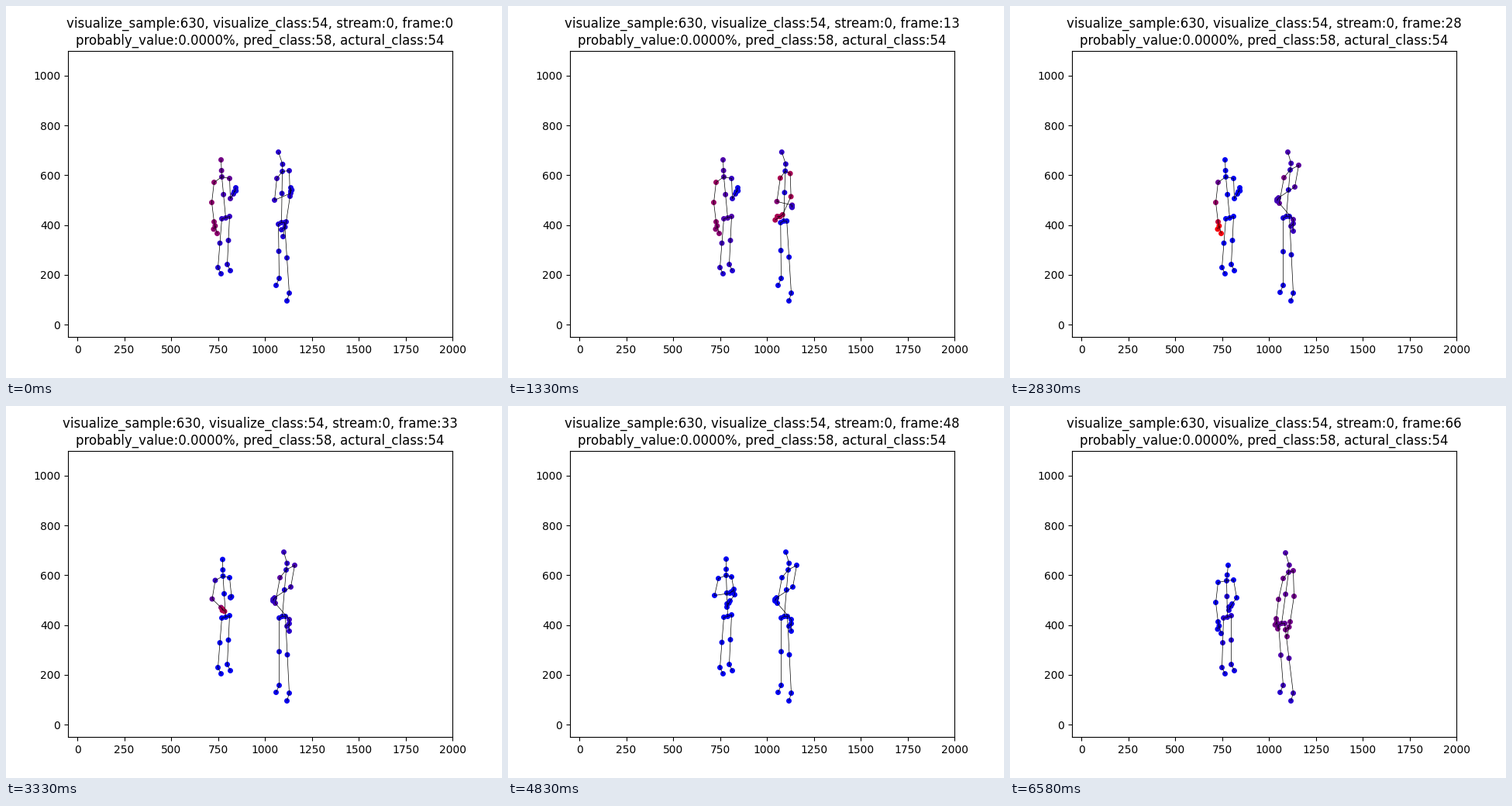
Recreate the animation shown at these times as a matplotlib script. Size 640 px wide and 480 px high, loop 6660 ms.

```python
import numpy as np
import matplotlib.pyplot as plt
from matplotlib.animation import FuncAnimation
from matplotlib.collections import LineCollection

STEP_MS, LOOP_MS = 30, 6660
BEAT_MS = 1000 / 12


def pose(*points):
    return np.array(points, float)


def to_data(px):
    """Stage pixels (y down) to axes units."""
    x = (px[:, 0] + 0.5 - 80) / 496 * 2050 - 50
    y = 1100 - (px[:, 1] + 0.5 - 57.6) / 369.6 * 1150
    return np.column_stack([x, y])


def blend(keys, n):
    """Pose and (root, tip) heat at counter n from keys (n, pose, root, tip)."""
    times = [k[0] for k in keys]
    i = int(np.clip(np.searchsorted(times, n, side="right") - 1, 0, len(keys) - 2))
    u = (n - times[i]) / (times[i + 1] - times[i])
    a, b = keys[i], keys[i + 1]
    heat = [p + (q - p) * u for p, q in zip(a[2:], b[2:])]
    return a[1] + (b[1] - a[1]) * u, heat


def spine_joints(points, bulge):
    """Head, neck, chest, middle and base from head, chest and base."""
    head, chest, base = points
    neck = head + 0.63 * (chest - head) + (bulge, 0)
    return np.array([head, neck, chest, chest + 0.43 * (base - chest), base])


def arm_joints(points):
    """Shoulder, elbow, wrist, hand, tip and thumb."""
    shoulder, elbow, wrist, tip = points
    hand = wrist + 0.35 * (tip - wrist)
    dx, dy = tip - hand
    thumb = hand + (0.35 * dx - 0.3 * dy, 0.35 * dy + 0.3 * dx)
    return np.array([shoulder, elbow, wrist, hand, tip, thumb])


def leg_joints(hip, ankle, toe):
    return np.array([hip, (hip + ankle) / 2, ankle, ankle + toe])


class Body:
    def __init__(self, spine, arms, hips, ankles, toes, bulge=0, slide=0):
        self.spine, self.arms = spine, arms
        self.hips, self.ankles, self.toes = hips, ankles, toes
        self.bulge, self.slide = bulge, slide

    def at(self, n):
        """Joints, their heat, and the bones as chains of points."""
        points, (top, low) = blend(self.spine, n)
        spine = spine_joints(points, self.bulge)
        chest, base = spine[2], spine[4]
        joints, heat, bones = [spine], [np.linspace(top, low, 5)], [spine]

        for keys in self.arms:
            points, (root, tip) = blend(keys, n)
            arm = arm_joints(points)
            joints.append(arm)
            heat.append(np.interp(range(6), [0, 3], [root, tip]))
            bones += [np.vstack([chest, arm[:5]]), arm[[3, 5]]]

        # Only the first foot slides back
        ankles = self.ankles + [(0, np.interp(n, [19, 28], [0, self.slide])), (0, 0)]
        for hip, ankle, toe in zip(self.hips, ankles, self.toes):
            leg = leg_joints(base + hip, ankle, toe)
            joints.append(leg)
            heat.append(low * np.linspace(1, 0.4, 4))
            bones.append(np.vstack([base, leg]))
        return joints, heat, bones


def left_body():
    stand = pose((277, 198), (278, 220), (283, 273))
    tall = pose((281, 197), (281, 218), (283, 271))
    slump = pose((281, 205), (279, 225), (280, 272))
    hang = pose((268, 227), (265, 253), (268, 278), (272, 293))
    cross = pose((271, 222), (266, 244), (286, 241), (291, 236))
    bent = pose((288, 222), (289, 248), (293, 242), (296, 234))
    clasp = pose((288, 220), (292, 243), (286, 251), (282, 259))
    return Body(
        spine=[(0, stand, .45, .2), (8, stand, .4, .4), (28, stand, 0, 0),
               (38, tall, 0, 0), (48, tall, 0, 0), (66, slump, 0, .15)],
        arms=[[(0, hang, .55, .55), (8, hang, .75, .6), (19, hang, .42, .45),
               (28, hang, .4, .95), (38, cross, 0, .4), (48, cross, 0, 0),
               (66, hang, 0, .05)],
              [(0, bent, .38, .08), (28, bent, 0, 0), (38, clasp, 0, .08),
               (48, clasp, 0, 0), (66, clasp + (0, 4), 0, .08)]],
        hips=pose((-5, 1), (5, -2)),
        ankles=pose((273, 337), (285, 333)),
        toes=pose((4, 8), (4, 8)))


def right_body():
    upright = pose((351, 188), (356, 213), (355, 279))
    lean = pose((358, 188), (361, 211), (356, 271))
    back = pose((355, 189), (359, 214), (350, 280))
    cross = pose((349, 222), (346, 250), (367, 241), (367, 234))
    low = pose((353, 221), (347, 254), (365, 275), (365, 290))
    drop = pose((352, 222), (346, 249), (343, 274), (345, 287))
    hang = pose((365, 212), (366, 245), (361, 278), (357, 297))
    reach = pose((362, 220), (363, 246), (345, 258), (329, 250))
    fold = pose((372, 205), (367, 233), (346, 247), (344, 251))
    return Body(
        spine=[(0, upright, .15, .12), (8, upright, .15, .05),
               (28, lean, .28, .1), (48, lean, 0, 0), (66, back, .3, .38)],
        arms=[[(0, cross, .22, .08), (8, cross, .48, .02), (19, low, .9, .4),
               (28, low, .45, .22), (48, low, 0, 0), (66, drop, .42, .45)],
              [(0, hang, .15, .12), (8, hang, .42, .45), (19, reach, .92, .92),
               (28, fold, .35, .25), (48, fold, 0, 0), (66, hang, .42, .45)]],
        hips=pose((-4, 2), (4, 0)),
        ankles=pose((352, 351), (365, 370)),
        toes=pose((-4, 9), (-3, 10)),
        bulge=2.3, slide=9)


bodies = [left_body(), right_body()]

fig, ax = plt.subplots(figsize=(6.4, 4.8), dpi=100)
ax.set_xlim(-50, 2000)
ax.set_ylim(-50, 1100)
title = ax.set_title("")
dots = ax.scatter([], [], s=12, linewidths=1.5)
bones = LineCollection([], colors="black", linewidths=0.5, zorder=2)
ax.add_collection(bones)


def counter(ms):
    """Five poses per six beats; the third of each group is held twice."""
    beat = int((ms + 5) / BEAT_MS)
    return beat - (beat + 3) // 6


def update(step):
    n = counter(step * STEP_MS + 20)
    joints, heat, lines = [], [], []
    for body in bodies:
        j, h, b = body.at(n)
        joints += j
        heat += h
        lines += b
    heat = np.concatenate(heat)
    dots.set_offsets(to_data(np.concatenate(joints)))
    dots.set_color(np.column_stack([heat, 0 * heat, 0.95 * (1 - heat)]))
    bones.set_segments([to_data(line) for line in lines])
    title.set_text(
        f"visualize_sample:630, visualize_class:54, stream:0, frame:{n}\n"
        "probably_value:0.0000%, pred_class:58, actural_class:54")
    return dots, bones, title


anim = FuncAnimation(fig, update, frames=LOOP_MS // STEP_MS, interval=STEP_MS,
                     repeat=True, repeat_delay=0, blit=False)
plt.show()
```
